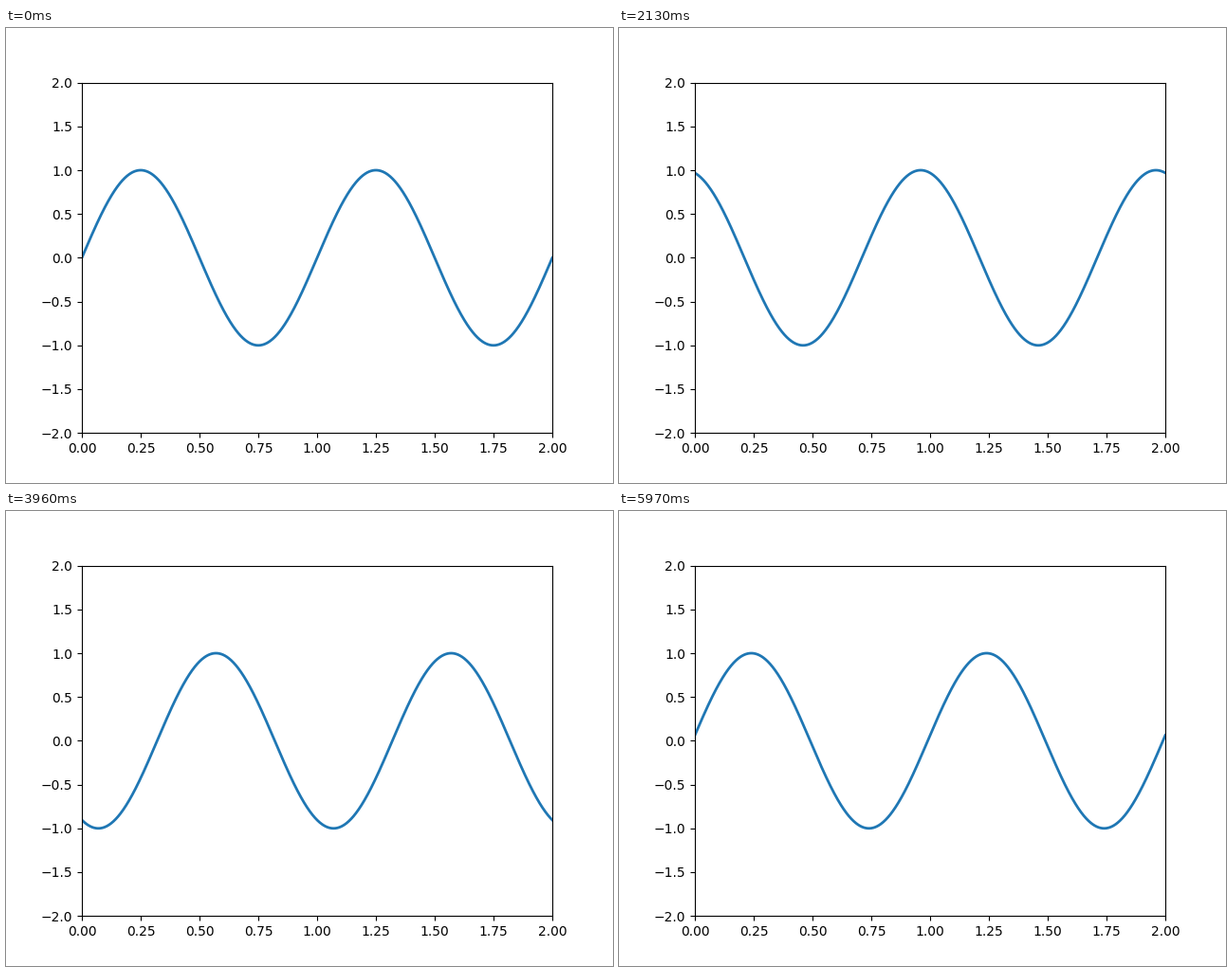
Animation, 640 px wide and 480 px high, one loop 6000 ms. Source, as a matplotlib script:

```python
import matplotlib.pyplot as plt
import numpy as np
from matplotlib.animation import FuncAnimation

FRAMES = 200
INTERVAL = 30  # ms
SPEED = 0.01   # shift of the wave per frame, in x units

fig = plt.figure(figsize=(6.4, 4.8), dpi=100)
ax = fig.add_subplot(xlim=(0, 2), ylim=(-2, 2))
x = np.linspace(0, 2, 1000)
line, = ax.plot(x, np.sin(2 * np.pi * x), lw=2)


def update(i):
    line.set_data(x, np.sin(2 * np.pi * (x - SPEED * i)))
    return line,


anim = FuncAnimation(fig, update, frames=FRAMES, interval=INTERVAL,
                     repeat=True, repeat_delay=0)
plt.show()
```
